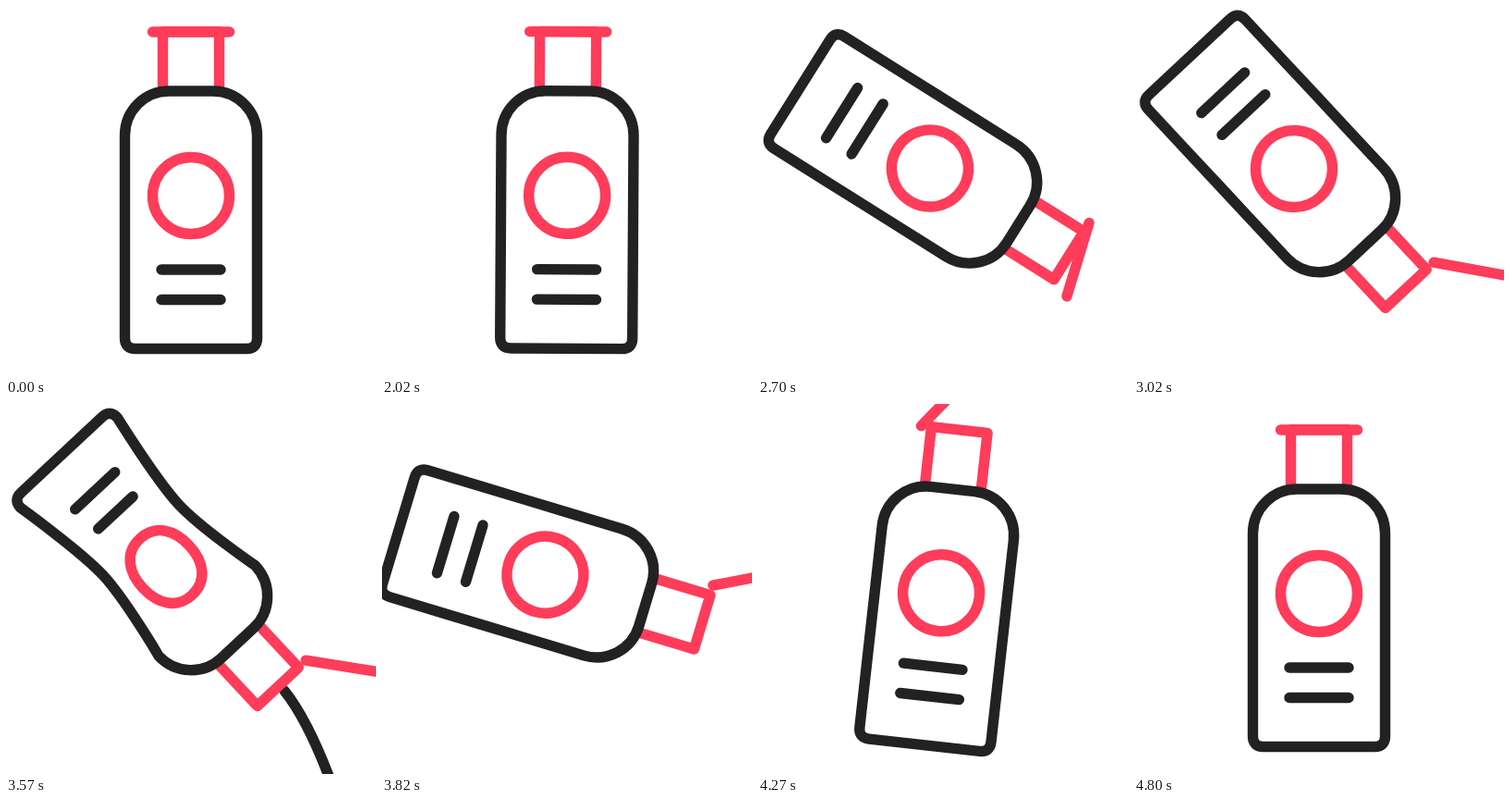
Animation, 400 px wide and 400 px high, one loop 4820 ms. Source, as an HTML page:

```html
<!DOCTYPE html>
<html lang="en">
<head>
<meta charset="utf-8">
<title>Squeeze bottle</title>
<style>
  html, body { margin: 0; width: 100%; height: 100%; overflow: hidden; background: #fff; }
  svg { display: block; width: 100%; height: 100%; }
  path { fill: none; stroke: #222; stroke-width: 11.4; stroke-linecap: round; stroke-linejoin: round; }
  .red { stroke: #ff3c5a; }
</style>
</head>
<body>
<svg viewBox="0 0 400 400">
  <path id="stream" d="M301 310Q328 344 354 416" pathLength="100"/>
  <!-- bottle coordinates are relative to the centre of the label -->
  <g id="bottle">
    <path class="red" d="M-30.500-116V-177.300H30.500V-116"/>
    <path class="red" id="lid" d="M-41.500-177H41.500"/>
    <path id="body"/>
    <path class="red" id="label"/>
    <path id="lines"/>
  </g>
</svg>
<script>
const LOOP = 4820;
const $ = id => document.getElementById(id);

// Poses as [time, x, y, angle]
const tilt = [[2005, 200, 205, 0], [2300, 215, 180, 56.5], [2700, 186, 175.5, 122], [2950, 173, 176, 137]];
const back = [[3600, 173, 176, 137], [4020, 183, 196, 62.3], [4350, 200, 205, 0]];

const clamp = v => Math.min(1, Math.max(0, v));
const linear = (t, a, b) => clamp((t - a) / (b - a));
const ease = (t, a, b) => (1 - Math.cos(Math.PI * linear(t, a, b))) / 2;

// Smooth curve through the poses, at rest on both ends
function pose(keys, t) {
  const last = keys.length - 1;
  let i = 0;
  while (i < last - 1 && t > keys[i + 1][0]) i++;
  const a = keys[i], b = keys[i + 1], span = b[0] - a[0];
  const u = linear(t, a[0], b[0]), v = 1 - u;
  const slope = (k, c) => k === 0 || k === last ? 0
    : (keys[k + 1][c] - keys[k - 1][c]) / (keys[k + 1][0] - keys[k - 1][0]);
  return [1, 2, 3].map(c =>
    a[c] * v * v * (1 + 2 * u) + b[c] * u * u * (3 - 2 * u)
    + span * u * v * (slope(i, c) * v - slope(i + 1, c) * u));
}

function drawBottle(squeeze) {
  const w = 71.5 - 15.5 * squeeze;
  $('body').setAttribute('d',
    `M-24-113H24A47.500 48 0 0 1 71.500-65C71.500-65 ${w} 5 ${w} 40C${w} 75 71.500 154 71.500 154` +
    `Q71.500 165.500 60 165.500H-60Q-71.500 165.500-71.500 154` +
    `C-71.500 154 ${-w} 75 ${-w} 40C${-w} 5-71.500-65-71.500-65A47.500 48 0 0 1-24-113Z`);

  // The sides of the label move in while its ends stay wide
  const r = 41.5, k = r * 0.5523, side = r * (1 - 0.18 * squeeze);
  $('label').setAttribute('d',
    `M0 ${-r}C${k} ${-r} ${side} ${-k} ${side} 0S${k} ${r} 0 ${r}S${-side} ${k} ${-side} 0S${-k} ${-r} 0 ${-r}Z`);

  const upper = 32 * (1 - 0.2 * squeeze), lower = 32 * (1 - 0.08 * squeeze);
  $('lines').setAttribute('d', `M${-upper} 80H${upper}M${-lower} 112.500H${lower}`);
}

function draw(now) {
  const t = now % LOOP;
  const [x, y, angle] = pose(t < 3300 ? tilt : back, t);
  $('bottle').setAttribute('transform', `translate(${x} ${y}) rotate(${angle})`);

  const open = 128 * (ease(t, 2600, 3050) - ease(t, 3600, 4800));
  $('lid').setAttribute('transform', `rotate(${-open} -41.500 -177)`);

  drawBottle(ease(t, 3050, 3250) - ease(t, 3580, 3780));

  const head = 100 * linear(t, 3060, 3220), tail = 100 * linear(t, 3580, 3740);
  const stream = $('stream');
  stream.style.display = head > tail ? '' : 'none';
  stream.setAttribute('stroke-dasharray', `0 ${tail} ${head - tail} 200`);

  requestAnimationFrame(draw);
}
requestAnimationFrame(draw);
</script>
</body>
</html>
```
